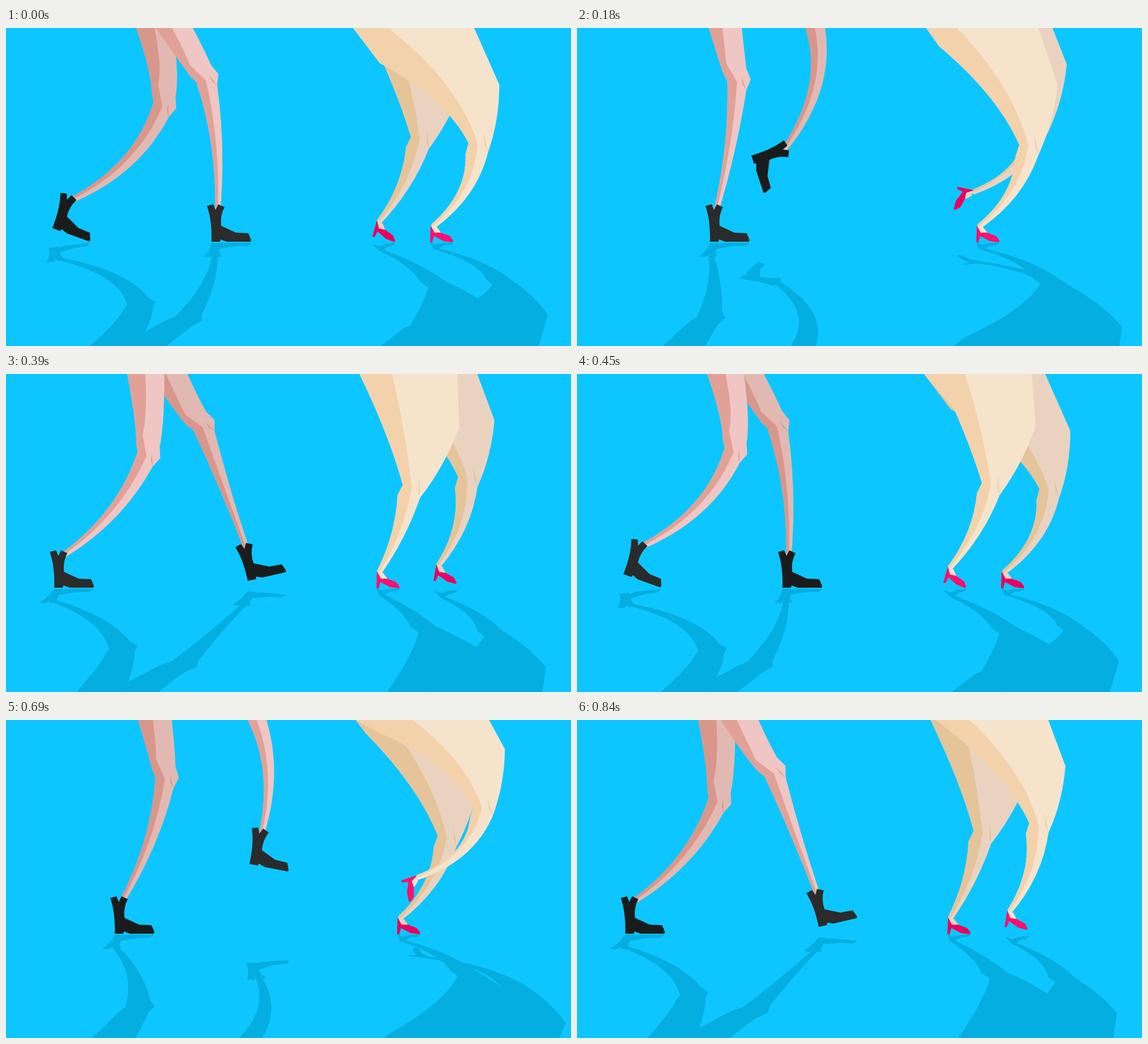
Animation, 998 px wide and 561 px high, one loop 0.9 s. Source, as an HTML page with a canvas:

```html
<!DOCTYPE html>
<html lang="en">
<head>
<meta charset="utf-8">
<title>Walking legs</title>
<style>
  html, body { margin: 0; width: 100%; height: 100%; overflow: hidden; background: #0dc6ff; }
  canvas { display: block; }
</style>
</head>
<body>
<canvas id="stage" width="998" height="561"></canvas>
<script>
const ctx = document.getElementById('stage').getContext('2d');
const LOOP = 900, STEP = 30, LAST = 28, LIFT = 420;
const SKY = '#0dc6ff', SHADE = '#05aee0';
const RAD = Math.PI / 180;

// A stride is a steady backward slide on the ground, then a swing through a few
// key poses: time, heel x, heel y, foot angle (and shin lean for the full leg).
const BOOT_STRIDE = {
  planted: t => [363 - 0.712 * t, 377, 0],
  swing: [[450, 82, 353, 20], [570, 225, 254, 69], [630, 308, 225, 72],
    [690, 430, 254, 11], [750, 536, 296, -51], [840, 427, 365, -13]]
};
const SHOE_STRIDE = {
  planted: t => [749 - 0.243 * t, 378, 0, 28 - ((t - 130) / 68) ** 2],
  swing: [[450, 647, 368, 14, 20], [570, 654, 307, 71, 37.5], [630, 672, 280, 100, 42],
    [690, 698, 283, 70, 42], [750, 734, 307, 43, 29], [840, 755, 365, 8, 12]]
};

const BOOT = [[-8, -63], [3, -66], [7, -56], [12, -66], [23, -61], [15, -46, 17, -28],
  [43, -16], [65, -15], [70, -3], [69, 0], [27, 0], [16, -4], [15, 0], [0, 0], [1, -38, -8, -63]];
const SHOE = [[1, -30], [8, -17], [19, -17], [35, -11], [41, -3], [40, 0], [24, -2], [7, -11], [4, 0], [0, 0]];
const INSTEP = [[1, -30], [12, -27], [20, -16], [8, -12]];

const THIN_NEAR = { light: '#efc6c3', dark: '#e2a196', foot: '#2b2b2b' };
const THIN_FAR = { light: '#e2b9b2', dark: '#d8978a', foot: '#1a1c1c' };
const FULL_NEAR = { light: '#f6e3cc', dark: '#f3d1ab', foot: '#ff0f6f' };
const FULL_FAR = { light: '#e9d3c0', dark: '#e5c49a', foot: '#eb0060' };

// Monotone cubic through the swing keys
function footPose({ planted, swing }, t) {
  if (t <= LIFT) return planted(t);
  const keys = [[LIFT, ...planted(LIFT)], ...swing, [LOOP, ...planted(0)]];
  const i = keys.findIndex(k => k[0] > t) - 1;
  const [t0, ...from] = keys[i], h = keys[i + 1][0] - t0, u = (t - t0) / h;
  return from.map((a, c) => {
    const rate = j => {
      const p = keys[j], q = keys[j + 1];
      return p && q ? (q[c + 1] - p[c + 1]) / (q[0] - p[0]) : rate(i);
    };
    const slope = (p, q) => p * q > 0 ? 2 * p * q / (p + q) : 0;
    const r = rate(i), m0 = slope(rate(i - 1), r), m1 = slope(r, rate(i + 1));
    return a + h * u * (m0 + u * (3 * r - 2 * m0 - m1 + u * (m0 + m1 - 2 * r)));
  });
}

const flat = (x, y) => [x, y];
function onFloor(x, y) {
  const rise = 377 - y, scale = 1 / (1 - 0.00067 * rise);
  return [495 + (x - 495) * scale, 378.7 + 0.375 * rise * scale];
}
let project = flat, tint = null;

// Points are [x, y]; curves are [controlX, controlY, x, y].
function fill(color, points) {
  ctx.fillStyle = tint || color;
  ctx.beginPath();
  for (const [a, b, c, d] of points) {
    if (c === undefined) ctx.lineTo(...project(a, b));
    else ctx.quadraticCurveTo(...project(a, b), ...project(c, d));
  }
  ctx.fill();
}

function placer(x, y, degrees) {
  const c = Math.cos(degrees * RAD), s = Math.sin(degrees * RAD);
  return (px, py) => [x + px * c - py * s, y + px * s + py * c];
}
const placeAll = (at, shape) => shape.map(([a, b, c, d]) =>
  c === undefined ? at(a, b) : [...at(a, b), ...at(c, d)]);

// Control point leaving `from` at an angle clockwise from straight down
function bend(from, to, degrees, amount = 0.5) {
  const d = Math.hypot(to[0] - from[0], to[1] - from[1]) * amount;
  return [from[0] - Math.sin(degrees * RAD) * d, from[1] + Math.cos(degrees * RAD) * d];
}

// Two-bone knee, always bending forward
function solveKnee([hx, hy], [ax, ay], thigh, calf) {
  const dx = ax - hx, dy = ay - hy, d = Math.hypot(dx, dy);
  const along = (thigh ** 2 - calf ** 2 + d * d) / (2 * d);
  const out = Math.sqrt(Math.max(0, thigh ** 2 - along ** 2));
  return [hx + (dx * along + dy * out) / d, hy + (dy * along - dx * out) / d];
}

function shin(back, middle, front, ankle, turn, [backTurn, middleTurn, frontTurn]) {
  const mid = bend(middle, ankle, turn + middleTurn);
  const dx = ankle[0] - mid[0], dy = ankle[1] - mid[1], k = 4.5 / Math.hypot(dx, dy);
  const left = [ankle[0] - dy * k, ankle[1] + dx * k];
  const right = [ankle[0] + dy * k, ankle[1] - dx * k];
  const down = [...bend(back, left, turn + backTurn), ...left];
  return {
    whole: [down, right, [...bend(front, right, turn + frontTurn), ...front]],
    shaded: [down, ankle, [...mid, ...middle]]
  };
}

function thinLeg(t, skin) {
  const hipY = -97 - 37 * Math.abs(Math.sin(Math.PI * (t + 38) / 450)) ** 3;
  const foot = placer(...footPose(BOOT_STRIDE, t)), ankle = foot(11, -54);
  const [kx, ky] = solveKnee([200, hipY], ankle, 236, 231);
  const thighAngle = Math.atan2(kx - 200, ky - hipY);
  const shinAngle = Math.atan2(ankle[0] - kx, ankle[1] - ky);
  const turn = 22.5 - (thighAngle + shinAngle) / 2 / RAD;

  const knee = placer(kx, ky, turn);
  const back = knee(0, 0), hollow = knee(-10, -9), cap = knee(26, -30);
  const ridge = knee(-11, -29), middle = knee(17, -3), front = knee(37, 6);
  const toHip = (from, x, angle) => [...bend(from, [x, hipY], turn + angle, 0.25), x, hipY];
  const lower = shin(back, middle, front, ankle, turn, [-18.5, -13, -8]);
  const rear = [[193, hipY], [...bend(hollow, [193, hipY], turn + 144.5, 0.25), ...hollow], back];
  fill(skin.light, [...rear, ...lower.whole, knee(39, -14), cap, toHip(cap, 278, 156)]);
  fill(skin.dark, [...rear, ...lower.shaded, ridge, toHip(ridge, 238, 159)]);
  fill(skin.dark, [knee(22, -13), knee(28, -1), front]);
  fill(skin.foot, placeAll(foot, BOOT));
}

function fullLeg(t, skin) {
  const [x, y, angle, lean] = footPose(SHOE_STRIDE, t);
  const foot = placer(x, y, angle), ankle = foot(5, -28);
  const kx = ankle[0] + 140 * Math.sin(lean * RAD), ky = ankle[1] - 140 * Math.cos(lean * RAD);
  const turn = (760 - kx) / 10, knee = placer(kx, ky, turn);
  const back = knee(0, 0), hollow = knee(7, -19), middle = knee(23, -17), front = knee(40, 0);

  // The thigh is pushed forward as the knee lifts; the hip sways once per step.
  const lift = 225 - ky, sway = t % 450 / 450;
  const left = [613 + 9 * sway, 0], seat = [659 - 48 * sway + lift / 2, 62 - 75 * sway];
  const topMid = [672 + 0.9 * lift, 0], right = [793 + 0.28 * (kx - 695) + lift / 2, 0];
  const fy = Math.min(100, 1.1 * ky - 140);
  const fx = right[0] + (front[0] - right[0]) * fy / ky + 0.15 * ky;

  const lower = shin(back, middle, front, ankle, turn + (lean - 23) * 0.6, [2, 8, 18]);
  const rear = [left, seat, [...bend(hollow, seat, turn + 158, 0.42), ...hollow], back];
  fill(skin.light, [...rear, ...lower.whole,
    [(front[0] + fx) / 2 + 10, (front[1] + fy) / 2 + 4, fx, fy], right]);
  fill(skin.dark, [...rear, ...lower.shaded,
    [...bend(middle, topMid, turn + 167, 0.45), ...topMid]]);
  fill(skin.dark, [knee(34, -37), knee(35, -13), knee(40, -1), knee(38, -14)]);
  fill(skin.light, placeAll(foot, INSTEP));
  fill(skin.foot, placeAll(foot, SHOE));
}

function walkers(time) {
  const opposite = (time + LOOP / 2) % LOOP;
  thinLeg(opposite, THIN_FAR);
  thinLeg(time, THIN_NEAR);
  fullLeg(opposite, FULL_FAR);
  fullLeg(time, FULL_NEAR);
}

function draw(now) {
  const time = Math.min(Math.floor(now % LOOP / STEP), LAST) * STEP;
  ctx.fillStyle = SKY;
  ctx.fillRect(0, 0, 998, 561);
  project = onFloor;
  tint = SHADE;
  walkers(time);
  project = flat;
  tint = null;
  walkers(time);
}

const start = performance.now();
function tick() {
  draw(performance.now() - start);
  requestAnimationFrame(tick);
}
tick();
</script>
</body>
</html>
```
